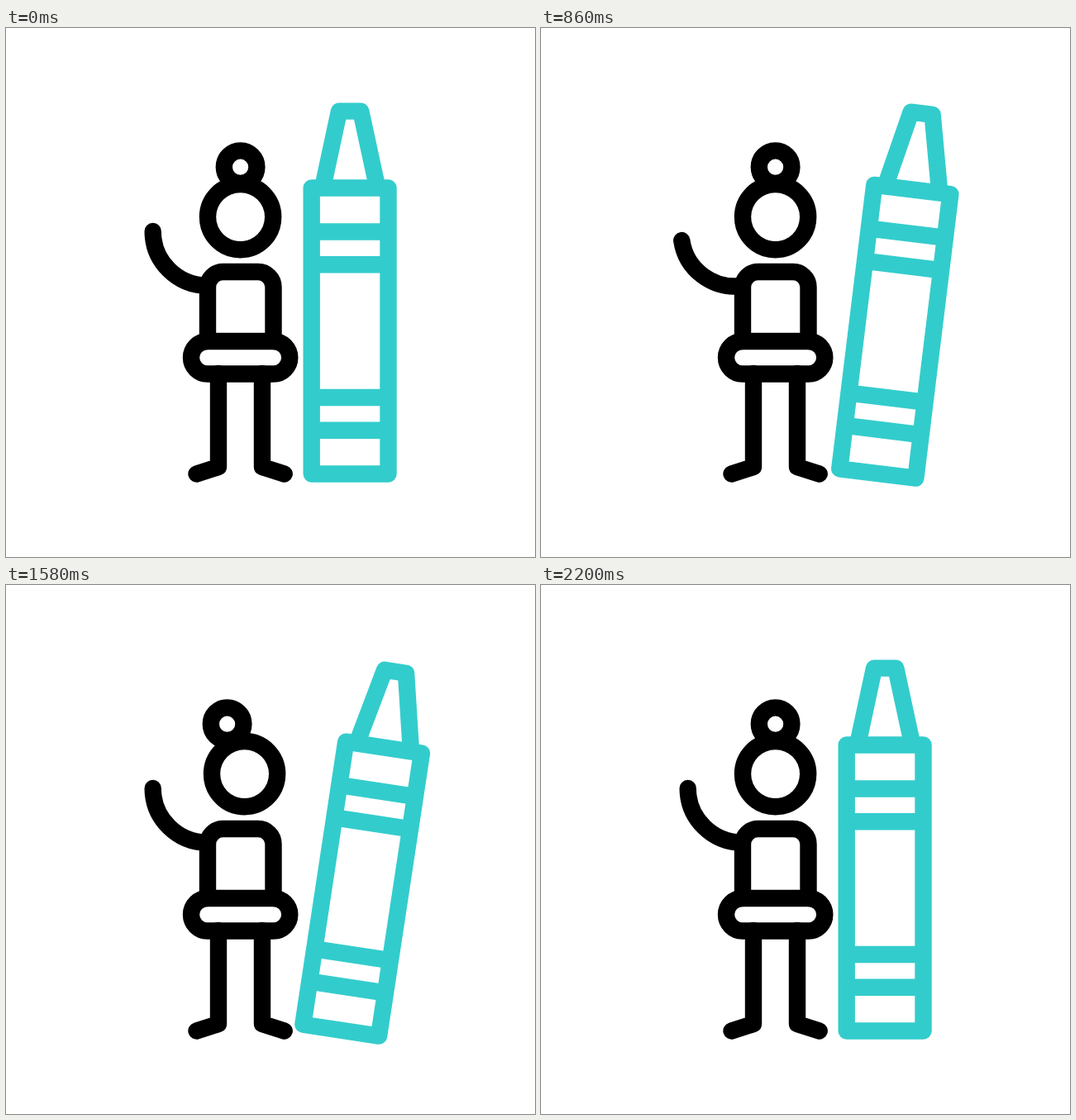
An HTML page that plays this animation: 640x640 px, repeating every 2.4 s.

```html
<!DOCTYPE html>
<html lang="en">
<head>
<meta charset="utf-8">
<title>Girl and crayon</title>
<style>
  html, body { margin: 0; width: 100%; height: 100%; overflow: hidden; background: #fff; }
  svg { display: block; width: 100vw; height: 100vh; }
  g { fill: none; stroke-width: 20.4; stroke-linejoin: round; }
  #crayon { stroke: #33cccc; }
  #girl { stroke: #000; stroke-linecap: round; }
</style>
</head>
<body>
<svg viewBox="0 0 640 640">
  <g id="crayon">
    <rect x="369.7" y="193.5" width="92.8" height="346"/>
    <path d="M383.8 190L403 100.6H429.3L448.6 190"/>
    <path d="M370 246.5H462M370 286.2H462M370 447H462M370 486.7H462"/>
  </g>
  <g id="girl">
    <path id="arm"/>
    <path d="M244 379V313.5A18.5 18.5 0 0 1 262.5 295H305A18.5 18.5 0 0 1 323.5 313.5V379"/>
    <rect x="224" y="379" width="119.3" height="39.5" rx="19.75"/>
    <path d="M257 418V531L230.5 539.5M310 418V531L336.7 539.5"/>
    <circle id="head" cx="283.6" cy="228.6" r="39.6"/>
    <circle id="bun" cx="283.6" cy="168.2" r="19.8"/>
  </g>
</svg>
<script>
const LOOP = 2400, STEP = 20;
const part = id => document.getElementById(id);
const crayon = part('crayon'), arm = part('arm'), head = part('head'), bun = part('bun');

const linear = u => u;
const smooth = u => u * u * (3 - 2 * u);
const mix = (a, b, u) => a + (b - a) * u;

// Keys are [time, value]; returns the two values around t and the eased progress.
function span(keys, t, ease) {
  let i = keys.findIndex(k => k[0] > t);
  if (i < 0) i = keys.length;
  const from = keys[Math.max(i - 1, 0)], to = keys[Math.min(i, keys.length - 1)];
  const u = from === to ? 0 : (t - from[0]) / (to[0] - from[0]);
  return [from[1], to[1], ease(u)];
}
const at = (keys, t, ease) => mix(...span(keys, t, ease));

const tilt = [[200, 0], [700, 11.1], [1200, -6], [1700, 11.1], [2200, 0]];
const nod = [[1000, 0], [1300, 1], [1900, 1], [2200, 0]];

// The arm blends between poses of one curve turned around the shoulder.
const shoulder = [244, 311.8];
const curve = [[-66.3, -65.8], [-66.3, -29.4], [-36.6, 0], [0, 0]];
function pose(deg) {
  const a = deg * Math.PI / 180, c = Math.cos(a), s = Math.sin(a);
  return curve.flatMap(([x, y]) => [shoulder[0] + x * c - y * s, shoulder[1] + x * s + y * c]);
}
const wave = [[200, 0], [500, 13], [800, -13.4], [1100, 13], [1400, 0]]
  .map(([t, deg]) => [t, pose(deg)]);

function draw(t) {
  crayon.setAttribute('transform', `rotate(${at(tilt, t, smooth)} 416.1 467)`);
  const [a, b, u] = span(wave, t, linear);
  const p = a.map((v, i) => mix(v, b[i], u).toFixed(2));
  arm.setAttribute('d', `M${p[0]} ${p[1]}C${p.slice(2).join(' ')}`);
  const n = at(nod, t, linear);
  head.setAttribute('cx', 283.6 + 5 * n);
  bun.setAttribute('cx', 283.6 - 16 * n);
}

const start = performance.now();
function tick() {
  const t = (performance.now() - start) % LOOP;
  draw(Math.floor(t / STEP) * STEP);
  requestAnimationFrame(tick);
}
draw(0);
requestAnimationFrame(tick);
</script>
</body>
</html>
```
